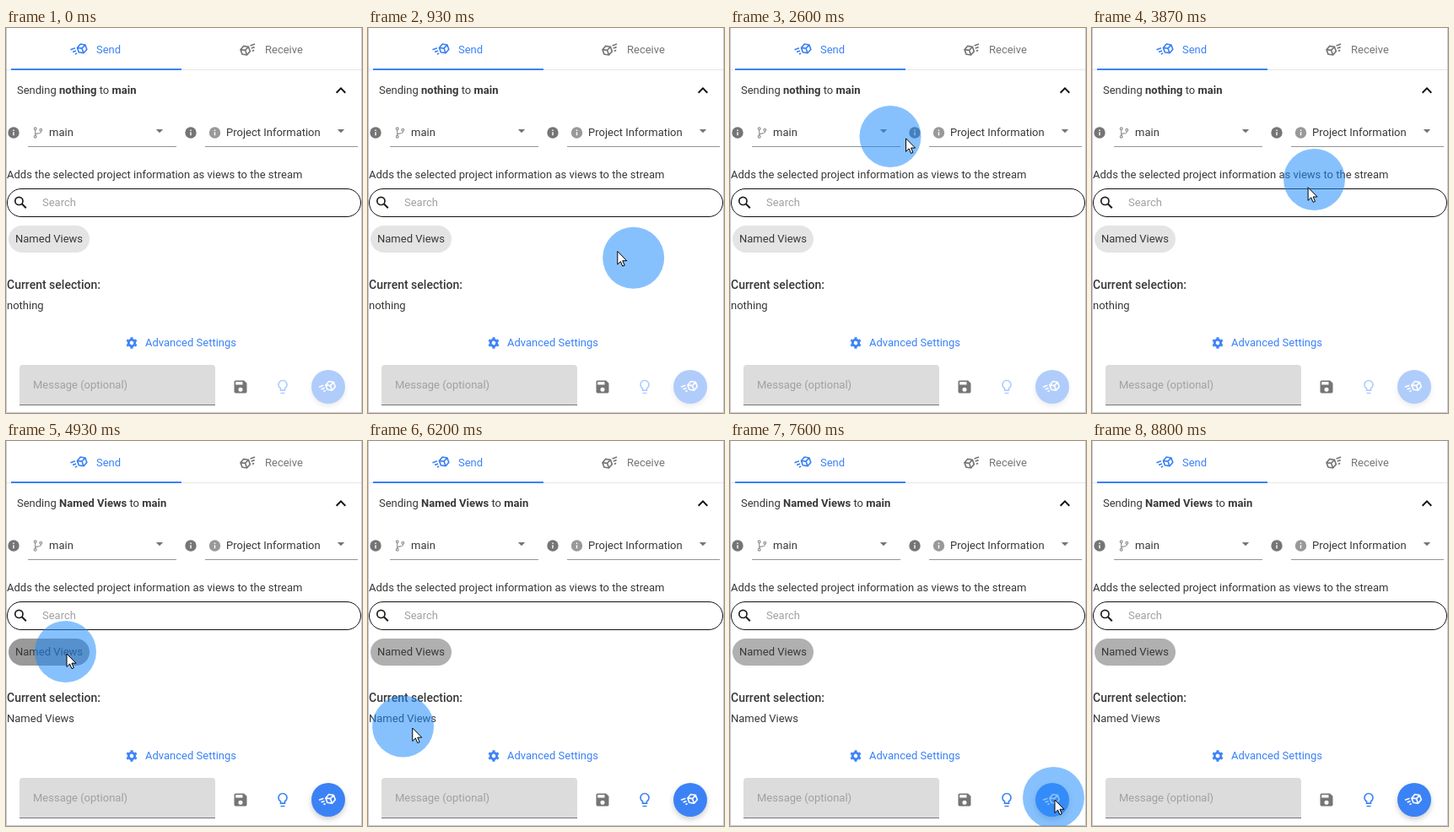
Animation, 422 px wide and 456 px high, one loop 9670 ms. Source, as an HTML page:

```html
<!DOCTYPE html>
<html lang="en">
<head>
<meta charset="utf-8">
<title>Send panel</title>
<style>
  html, body { margin: 0; width: 100%; height: 100%; overflow: hidden; background: #fff; }
  svg { display: block; font: 13px Roboto, sans-serif; fill: #383838; }
  .strong { font-weight: 700; }
  .medium { font-weight: 500; }
  .blue { fill: #3b82f6; color: #3b82f6; }
  .grey { fill: #757575; color: #757575; }
  .white { fill: #fff; color: #fff; }
  .hint { fill: #a0a0a0; }
  .line { fill: none; stroke: #949494; }
  .icon { fill: none; stroke: currentColor; stroke-width: 2; transform: scale(.833) translate(-12px, -12px); }
  #halo { fill: #1e8afb; fill-opacity: .53; }
  #fab { filter: drop-shadow(0 3px 3px #0003); }
</style>
</head>
<body>
<svg width="422" height="456" viewBox="0 0 422 456">
  <defs>
    <path id="cube" class="icon" d="M16 5.2L22 8.6V15.4L16 18.8L10 15.4V8.6ZM10 8.6L16 11.6L22 8.6M16 11.6V18.8M0 8H7M2 12H7M4 16H7"/>
    <path id="bulb" class="icon" d="M9 17H15V14.2A6 6 0 1 0 9 14.2ZM9 21H15"/>
    <g id="info"><circle r="6.7"/><path d="M0-3.4v1.4M0-.7v4" stroke="#fff" stroke-width="1.4"/></g>
    <path id="caret" d="M-4.2-2h8.4l-4.2 4.2z"/>
  </defs>

  <path d="M0 49.5H422" stroke="#e6e6e6"/>
  <path d="M.5 0V455.5H421.5V0" fill="none" stroke="#c5c9d6"/>

  <!-- Tabs -->
  <rect class="blue" x="6" y="48" width="202" height="2"/>
  <use class="blue" href="#cube" transform="translate(87 25.5) rotate(-20)"/>
  <text class="blue" x="107" y="30">Send</text>
  <use class="grey" href="#cube" transform="translate(286.8 25.5) rotate(-20) scale(-1 1)"/>
  <text class="grey" x="307" y="30">Receive</text>

  <!-- Header -->
  <text x="13" y="78">Sending <tspan class="strong" data-selection></tspan> to <tspan class="strong">main</tspan></text>
  <path d="M391.7 76.7l5.3-5.3l5.3 5.3" fill="none" stroke="#111" stroke-width="2"/>

  <!-- Selects -->
  <use class="grey" href="#info" x="9" y="124"/>
  <g class="line" stroke-width="1.2">
    <circle cx="34.7" cy="119.3" r="1.4"/><circle cx="34.7" cy="128.7" r="1.4"/><circle cx="41.3" cy="120.7" r="1.4"/>
    <path d="M34.7 120.7v6.6q0-2.5 3.5-2.5t3.1-2.7"/>
  </g>
  <text x="51" y="128">main</text>
  <use class="grey" href="#caret" x="182" y="122"/>
  <path class="line" id="branchLine" d="M26 140.5H202"/>
  <use class="grey" href="#info" x="219" y="124"/>
  <use href="#info" x="247.5" y="124" fill="#999"/>
  <text x="261" y="128">Project Information</text>
  <use class="grey" href="#caret" x="397" y="122"/>
  <path class="line" id="filterLine" d="M236 140.5H417"/>

  <!-- Filter -->
  <text x="1" y="178">Adds the selected project information as views to the stream</text>
  <rect x="1.5" y="190.5" width="419" height="33" rx="16.5" fill="none" stroke="#111"/>
  <g fill="none" stroke="#1c1c1c"><circle cx="15.4" cy="204.9" r="4.6" stroke-width="1.7"/><path d="M18.8 208.3l5 5" stroke-width="2"/></g>
  <text class="hint" x="43" y="211">Search</text>
  <rect id="chip" x="3" y="234" width="96" height="32" rx="16"/>
  <text x="11" y="254">Named Views</text>
  <text class="medium" x="1" y="309" font-size="14">Current selection:</text>
  <text x="1" y="333" data-selection></text>

  <!-- Footer -->
  <g fill="none" stroke="#3b82f6" transform="translate(149 373) rotate(30)">
    <circle r="3.7" stroke-width="2.8"/>
    <circle r="5.7" stroke-width="2" pathLength="12" stroke-dasharray="1 1" stroke-dashoffset=".5"/>
  </g>
  <text class="blue" x="165" y="377">Advanced Settings</text>
  <path d="M16 447V403q0-4 4-4H244q4 0 4 4V447z" fill="#dcdcdc"/>
  <path d="M16 446.5H248" stroke="#777"/>
  <text class="hint" x="32" y="427">Message (optional)</text>
  <g transform="translate(268 415) scale(.833)">
    <path class="grey" d="M3 5q0-2 2-2h12l4 4v12q0 2-2 2H5q-2 0-2-2z"/>
    <path class="white" d="M5 5h10v4H5z"/><circle class="white" cx="12" cy="16" r="3"/>
  </g>
  <g class="blue" data-action><use href="#bulb" x="328" y="425"/></g>
  <g data-action>
    <circle id="fab" class="blue" cx="382" cy="425" r="20"/>
    <circle id="fabHover" class="white" cx="382" cy="425" r="20"/>
    <use class="white" href="#cube" transform="translate(381.5 425) rotate(-20)"/>
  </g>

  <circle id="halo" cx=".5" cy=".5" r="36.5"/>
  <path id="pointer" d="M0 0V15.5L3.6 12L6 17.6L8.4 16.6L6 11.2H11Z" fill="#fff" stroke="#000" stroke-linejoin="round"/>
</svg>
<script>
const LOOP = 9670, FPS = 15, SELECT_AT = 4730, HALO_LAG = 30;

// Each move eases to a place and rests there; a bend curves the way
const entry = { x: 500, y: 366 };
const moves = [
  { start: 500, end: 1470, x: 58, y: 142 },   // branch select
  { start: 1600, end: 2070, x: 64, y: 129 },
  { start: 2270, end: 2930, x: 315, y: 127 }, // filter select
  { start: 3530, end: 4530, x: 70, y: 249, bend: { x: 225, y: 239 } }, // chip
  { start: 5000, end: 5600, x: 70, y: 342 },  // current selection
  { start: 5670, end: 6130, x: 30, y: 338 },
  { start: 6130, end: 6430, x: 110, y: 334 },
  { start: 6600, end: 6830, x: 272, y: 333 },
  { start: 6830, end: 7600, x: 383, y: 422 }, // send button
  { start: 7800, end: 8730, x: 475, y: 430 }
];

const $ = id => document.getElementById(id);
const all = name => document.querySelectorAll(`[data-${name}]`);
const ramp = (t, start, end = start + 200) => Math.min(1, Math.max(0, (t - start) / (end - start)));
const pulse = (t, start, end) => ramp(t, start) - ramp(t, end);
const ease = u => u * u * (3 - 2 * u);
const mix = (a, b, u) => ({ x: a.x + (b.x - a.x) * u, y: a.y + (b.y - a.y) * u });
const grey = level => `rgb(${level},${level},${level})`;

function position(t) {
  return moves.reduce((from, move) => {
    const u = ease(ramp(t, move.start, move.end));
    const bend = move.bend ?? mix(from, move, 0.5);
    return mix(mix(from, bend, u), mix(bend, move, u), u);
  }, entry);
}

const place = (id, { x, y }, dx = 0, dy = 0) =>
  $(id).setAttribute('transform', `translate(${x + dx} ${y + dy})`);

function draw(t) {
  place('halo', position(t));
  place('pointer', position(t + HALO_LAG), 2, 3);

  const selected = t >= SELECT_AT;
  all('selection').forEach(el => el.textContent = selected ? 'Named Views' : 'nothing');
  all('action').forEach(el => el.setAttribute('opacity', selected ? 1 : 0.4));

  $('branchLine').style.stroke = grey(148 - 115 * pulse(t, 1700, 2400));
  $('filterLine').style.stroke = grey(148 - 115 * pulse(t, 2650, 3600));
  $('chip').style.fill = grey((selected ? 176 : 228) - (selected ? 23 : 10) * pulse(t, 4330, 5130));
  $('fabHover').setAttribute('opacity', 0.1 * pulse(t, 7150, 8600));
}

function tick(now) {
  // The picture advances in whole steps
  const step = Math.floor((now % LOOP + 5) * FPS / 1000);
  draw(step * 1000 / FPS);
  requestAnimationFrame(tick);
}
requestAnimationFrame(tick);
</script>
</body>
</html>
```
